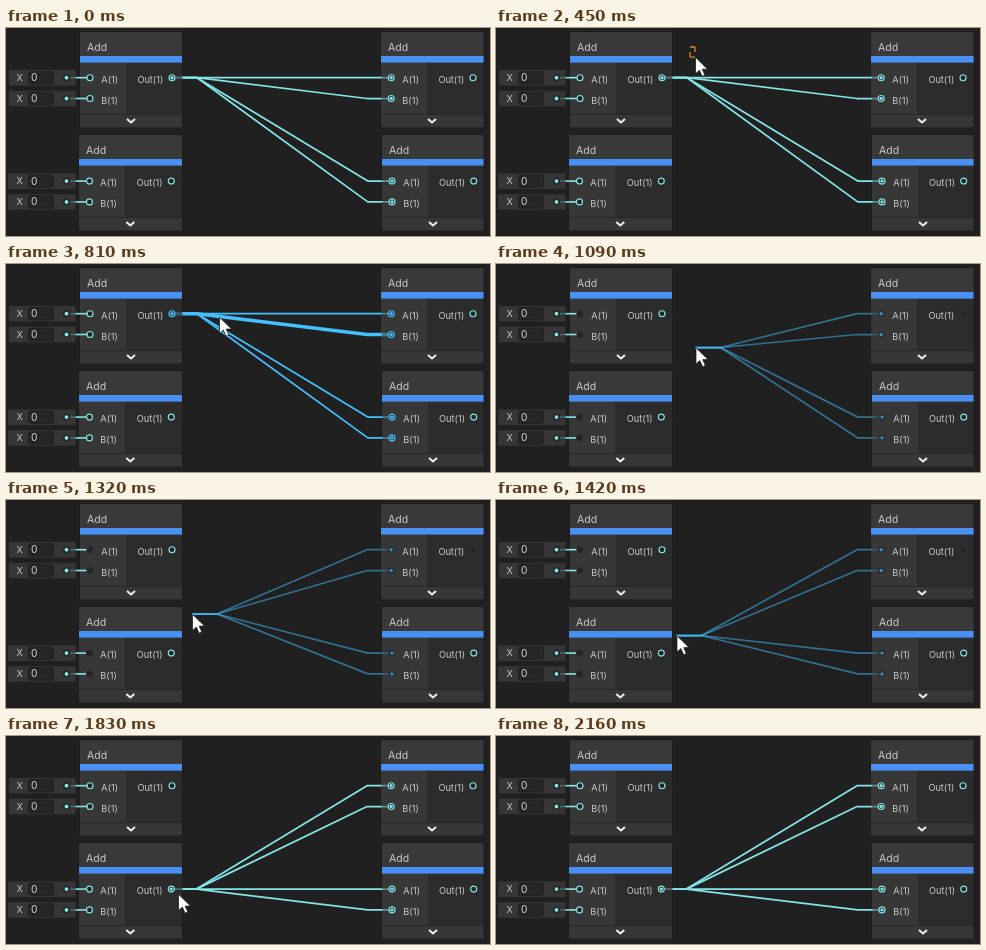
An HTML page for the animation above (2.8 s loop, 484 px wide and 208 px high).

```html
<!DOCTYPE html>
<html lang="en">
<head>
<meta charset="utf-8">
<title>Moving node edges</title>
<style>
  html, body { margin: 0; width: 100%; height: 100%; overflow: hidden; background: #202020; }
  svg { display: block; }
  text { font-family: Inter, Roboto, sans-serif; font-size: 9.2px; fill: #cacaca; }
  .title { font-size: 10.5px; }
  .value { font-size: 10.2px; fill: #d4d4d4; }
  .wire { fill: none; stroke-linejoin: round; }
  .ring { stroke-width: 1.15; }
  .chevron { fill: none; stroke: #f0f0f0; stroke-width: 2; }
</style>
</head>
<body>
<svg id="stage" width="484" height="208" viewBox="0 0 484 208">
  <rect width="484" height="208" fill="#202020"/>
  <g id="nodes"></g>
  <g id="wires"></g>
  <g id="veils"></g>
  <g id="ports"></g>
  <path id="marquee" fill="none" stroke="#d98a1c" stroke-width="1.3" stroke-dasharray="5 5"/>
  <path id="cursor" d="M.5 .2V16.6L4.4 13.1L7.1 19.2L9.8 18L7.2 12.1H12.5Z" fill="#fff" stroke="#151515" stroke-width=".7"/>
</svg>
<script>
const LOOP = 2800;
const TEAL = '#84e4e7', BLUE = '#44c0ff', DARK = '#242424';
const SELECT = 620, HOVER = 715, GRAB = 860, SNAP = 1470, DROP = 1830;
const $ = id => document.getElementById(id);

function add(parent, tag, attrs, label) {
  const el = document.createElementNS('http://www.w3.org/2000/svg', tag);
  set(el, attrs);
  if (label) el.textContent = label;
  $(parent).append(el);
  return el;
}
function set(el, attrs) {
  for (const k in attrs) el.setAttribute(k, attrs[k]);
}
const rect = (parent, x, y, width, height, fill, more) =>
  add(parent, 'rect', { x, y, width, height, fill, ...more });
const label = (x, y, str, cls = '') => add('nodes', 'text', { x, y, class: cls }, str);

function port(x, y) {
  const ring = add('ports', 'circle', { cx: x, cy: y, r: 3, class: 'ring', fill: DARK });
  const dot = add('ports', 'circle', { cx: x, cy: y, r: 1.7 });
  return { x, y, paint(stroke, fill = 'none') {
    set(ring, { stroke });
    set(dot, { fill });
  } };
}

function node(x, y, inX, outX, portY, midX) {
  const right = x > 200 ? 477.6 : 176, w = right - x, h = 95.5;
  const split = x + 46;
  rect('nodes', x - .5, y - .5, w + 1, h + 1, '#191919', { rx: 1.5 });
  rect('nodes', x, y, w, 25, '#393939', { rx: 1 });
  rect('nodes', x, y + 24, w, 6.8, '#4a90f2');
  rect('nodes', x, y + 30.8, 46, 51.2, '#373737');
  rect('nodes', split, y + 30.8, right - split, 51.2, '#2c2c2c');
  rect('nodes', x, y + 82.5, w, 13, '#373737');
  label(x + 7, y + 19, 'Add', 'title');
  label(x + 21.3, portY + 5, 'A(1)');
  label(x + 21.3, portY + 26.1, 'B(1)');
  label(outX - 34.6, portY + 5, 'Out(1)');
  add('nodes', 'path', { class: 'chevron', d: `M${midX - 4} ${y + 86.9}l4 3.5l4 -3.5` });
  return { a: port(inX, portY), b: port(inX, portY + 20.8), out: port(outX, portY) };
}

function constant(x, y, inX) {
  rect('nodes', x, y - 7.7, 69.5 - x, 15.5, '#363636', { rx: 1 });
  rect('nodes', 22.5, y - 6.2, 25, 12.5, '#252525', { rx: 2, stroke: '#1c1c1c', 'stroke-width': .7 });
  label(10.5, y + 3.2, 'X');
  label(25, y + 3.5, '0', 'value');
  const line = (x1, x2, stroke) =>
    add('nodes', 'path', { d: `M${x1} ${y}H${x2}`, stroke, 'stroke-width': 1.6 });
  line(61, 69.5, '#47686a');
  line(69.5, inX - 3, TEAL);
  add('nodes', 'circle', { cx: 60.5, cy: y, r: 3.6, fill: '#262626' });
  add('nodes', 'circle', { cx: 60.5, cy: y, r: 1.9, fill: TEAL });
}

const topLeft = node(74, 4, 84, 166, 49.7, 125);
const lowLeft = node(73, 107, 83.5, 165.3, 153.1, 124.3);
const topRight = node(375, 4, 385.2, 467, 49.7, 426);
const lowRight = node(376, 107, 386, 467.7, 153.1, 427);
for (const n of [topLeft, lowLeft])
  for (const p of [n.a, n.b]) constant(n === topLeft ? 3 : 2, p.y, p.x);

const free = [topLeft.a, topLeft.b, lowLeft.a, lowLeft.b];
const ends = [topRight.a, topRight.b, lowRight.a, lowRight.b];
const wireSet = () => ends.map(() => add('wires', 'path', { class: 'wire' }));
const ghosts = wireSet(), wires = wireSet();

// wires look faded where they run inside a node
for (const p of [topLeft.out, lowLeft.out]) rect('veils', p.x + 3, p.y - 3, 173.5 - p.x, 6, '#2c2c2c', { opacity: .68 });
for (const p of ends) rect('veils', p.x - 9.5, p.y - 3, 6.5, 6, '#373737', { opacity: .5 });

const route = (from, to) =>
  `M${from.x} ${from.y}H${from.x + 25}L${to.x - 24.2} ${to.y}H${to.x}`;

function drawWires(list, from, stroke, opacity, thick = -1) {
  list.forEach((el, i) => set(el, {
    d: route(from, ends[i]), stroke, opacity, 'stroke-width': i === thick ? 3.6 : 1.75
  }));
}

// the picture only changes on these beats
const beats = (from, to, n) => Array.from({ length: n }, (_, i) => from + (to - from) * i / (n - 1));
const changes = [0, ...beats(270, 760, 12), ...beats(810, 1320, 11),
  ...beats(1370, 1570, 5), 1650, 1830, ...beats(1980, 2160, 5)];

const track = [
  [270, 191, 2], [360, 194, 19], [448, 199, 29], [540, 212, 62], [600, 222, 90],
  [640, 222, 88], [715, 216, 62], [760, 213, 53], [810, 213, 53], [1320, 186, 114],
  [1520, 175, 157], [1650, 172, 158], [1975, 172, 158], [2160, 202, 192]
];

function pointer(t) {
  const i = Math.max(1, track.findIndex(k => k[0] >= t));
  const [t0, x0, y0] = track[i - 1], [t1, x1, y1] = track[i];
  const u = Math.min(1, Math.max(0, (t - t0) / (t1 - t0)));
  return { x: x0 + (x1 - x0) * u, y: y0 + (y1 - y0) * u };
}

function draw(now) {
  const time = now % LOOP;
  const t = changes.findLast(c => c <= time + .01);
  const visible = t >= 270 && t < 2159;
  const tip = visible ? pointer(t) : { x: 0, y: 0 };
  const drag = t >= GRAB && t < DROP, snap = drag && t >= SNAP;
  const picked = t >= SELECT && t < GRAB;
  const color = picked ? BLUE : TEAL;

  const home = t < GRAB ? topLeft.out : lowLeft.out;
  if (drag) drawWires(wires, tip, BLUE, .5);
  else drawWires(wires, home, color, 1, picked && t >= HOVER ? 1 : -1);
  drawWires(ghosts, lowLeft.out, TEAL, snap ? .5 : 0);

  for (const p of free) p.paint(drag ? '#2b2b2b' : TEAL);
  for (const p of ends) p.paint(drag ? '#2d3338' : color, drag ? '#3f8dbb' : color);
  topLeft.out.paint(t < GRAB ? color : TEAL, t < GRAB ? color : 'none');
  lowLeft.out.paint(TEAL, snap || t >= DROP ? TEAL : 'none');
  topRight.out.paint(drag ? '#303030' : TEAL);
  lowRight.out.paint(TEAL);

  const boxed = t >= 400 && t < SELECT;
  set($('marquee'), { d: boxed ? `M194 19H${tip.x}M${tip.x} 19V${tip.y}M${tip.x} ${tip.y}H194M194 ${tip.y}V19` : '' });
  set($('cursor'), {
    transform: `translate(${tip.x} ${tip.y})`,
    visibility: visible ? 'visible' : 'hidden'
  });
}

const start = performance.now();
function tick() {
  draw(performance.now() - start);
  requestAnimationFrame(tick);
}
tick();
</script>
</body>
</html>
```
